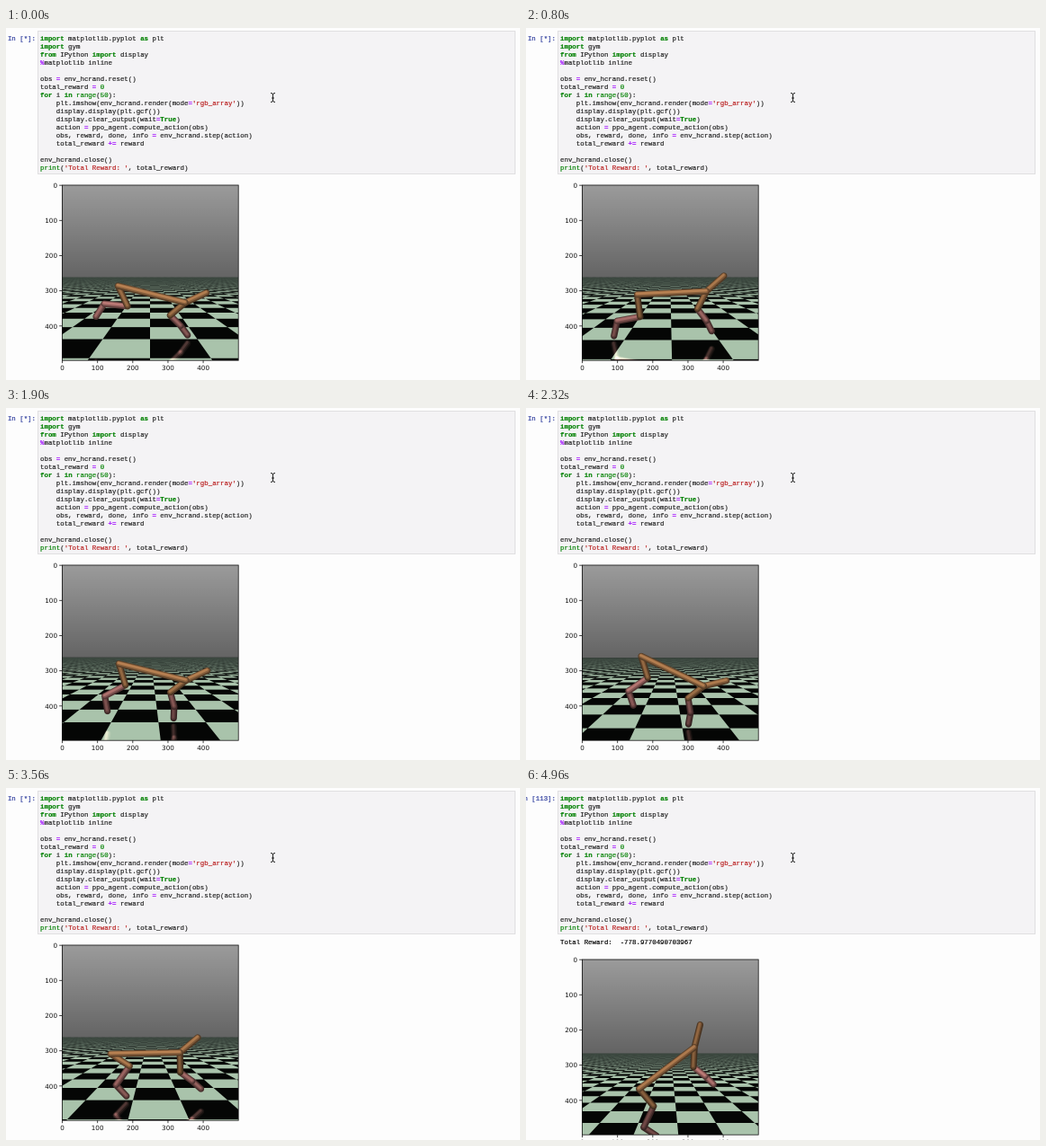
These frames come from a looping animation (571 px wide and 392 px high, 4.98 s). An HTML page with a canvas:

```html
<!DOCTYPE html>
<html lang="en">
<head>
<meta charset="utf-8">
<title>Notebook run</title>
<style>
html, body { margin: 0; width: 571px; height: 392px; overflow: hidden; background: #fdfdfd; }
body { position: relative; }
.cell { position: absolute; left: 35px; top: 3.3px; width: 531px; height: 160px; box-sizing: border-box; background: #f4f3f5; border: .7px solid #e0dfe1; }
pre { position: absolute; margin: 0; font: 7.41px/9px "Liberation Mono", "Courier New", monospace; color: #222; white-space: pre; -webkit-text-stroke: .2px currentColor; }
#code { left: 38px; top: 8px; }
#prompt { right: 538px; top: 8px; color: #303f9f; }
#total { left: 38px; top: 167.8px; color: #000; }
.k { color: #008000; font-weight: bold; }
.n { color: #008000; }
.s { color: #ba2121; }
.o { color: #aa22ff; font-weight: bold; }
svg, canvas { position: absolute; left: 0; top: 0; }
#plot { position: absolute; left: 0; top: 0; width: 571px; height: 392px; }
#plot.moved { top: 15.5px; }
#plot text { font: 7.2px "DejaVu Sans", sans-serif; fill: #111; }
#view { left: 62px; top: 175px; width: 196px; height: 195px; }
</style>
</head>
<body>
<div class="cell"></div>
<pre id="prompt">In [*]:</pre>
<pre id="code"><span class="k">import</span> matplotlib.pyplot <span class="k">as</span> plt
<span class="k">import</span> gym
<span class="k">from</span> IPython <span class="k">import</span> display
<span class="o">%</span>matplotlib inline

obs <span class="o">=</span> env_hcrand.reset()
total_reward <span class="o">=</span> <span class="n">0</span>
<span class="k">for</span> i <span class="k">in</span> <span class="n">range</span>(<span class="n">50</span>):
    plt.imshow(env_hcrand.render(mode<span class="o">=</span><span class="s">'rgb_array'</span>))
    display.display(plt.gcf())
    display.clear_output(wait<span class="o">=</span><span class="k">True</span>)
    action <span class="o">=</span> ppo_agent.compute_action(obs)
    obs, reward, done, info <span class="o">=</span> env_hcrand.step(action)
    total_reward <span class="o">+=</span> reward

env_hcrand.close()
<span class="n">print</span>(<span class="s">'Total Reward: '</span>, total_reward)</pre>
<pre id="total" hidden>Total Reward:  -778.9770490703967</pre>
<div id="plot">
  <canvas id="view"></canvas>
  <svg id="axes" width="571" height="392" overflow="visible">
    <rect x="62.4" y="175" width="195.8" height="195.2" fill="none" stroke="#111" stroke-width=".8"/>
  </svg>
</div>
<svg width="571" height="392" fill="none" stroke="#222" stroke-width="1">
  <path d="M294 72.5q2.5 0 2.5 1.5q0-1.5 2.5-1.5M296.5 74v7M294 82.5q2.5 0 2.5-1.5q0 1.5 2.5 1.5M295 78h3"/>
</svg>
<script>
const LOOP = 4980, STEP = 98, DONE = 4860, LAST = 49;
const $ = id => document.getElementById(id);

// Axis ticks and labels
let marks = '';
for (let i = 0; i < 5; i++) {
  const d = i * 39.15, x = 62.5 + d, y = 175.2 + d, label = i * 100;
  marks += `<path d="M59.2 ${y}h3M${x} 370.2v3" stroke="#111" stroke-width=".8"/>` +
    `<text x="57" y="${y + 2.7}" text-anchor="end">${label}</text>` +
    `<text x="${x}" y="381" text-anchor="middle">${label}</text>`;
}
$('axes').insertAdjacentHTML('beforeend', marks);

// Key poses: step, then degrees of torso, rear thigh, rear shin, front thigh, front shin
const POSES = [
  [0, 14, 65, 186, 140, 45],
  [3, -6, 72, 140, 127, 40],
  [12, 0, 76, 178, 124, 78],
  [19, 14, 73, 152, 143, 75],
  [28, 40, 92, 156, 123, 69],
  [43, -37, -5, 113, 45, -7],
  [LAST, -37, 50, 115, 93, 38]
];
const BROWN = [188, 132, 84], PINK = [204, 132, 128];
const CX = 160, HORIZON = 272.6, FOCAL = 236.6, TILE = 2 / 3;
const BALANCE = [162.5, 304.9], SOLE = 4.5;
const mean = list => list.reduce((a, b) => a + b, 0) / list.length;

function anglesAt(step) {
  const k = Math.max(1, POSES.findIndex(p => p[0] >= step));
  const a = POSES[k - 1], b = POSES[k], span = b[0] - a[0];
  const u = (step - a[0]) / span;
  const stride = 13 * Math.sin(2 * Math.PI * u * Math.round(span / 6));
  const swing = [0, 0, stride, stride, -stride, -stride];
  return a.map((v, i) => v + (b[i] - v) * u + swing[i]).slice(1);
}

// Limbs end to end from one joint; each link is [length, degrees, colour]
function chain([x, y], links) {
  return links.map(([len, deg, rgb]) => {
    const a = deg * Math.PI / 180, from = [x, y];
    x += len * Math.cos(a);
    y += len * Math.sin(a);
    return { from, to: [x, y], rgb };
  });
}

function bodyAt(step) {
  const [tilt, thighR, shinR, thighF, shinF] = anglesAt(step);
  const [torso, head] = chain([0, 0], [[77, tilt, BROWN], [26, tilt - 39, BROWN]]);
  // Each foot turns with its shin
  const rear = chain([0, 0], [[25, thighR, BROWN], [26, shinR, PINK], [17, 1.25 * shinR - 110, PINK]]);
  const front = chain(torso.to, [[22, thighF, BROWN], [16.5, shinF, PINK], [13, 1.3 * shinF - 5, PINK]]);
  const limbs = [...rear.reverse(), ...front.reverse(), head, torso];
  // The camera keeps the centre of mass still: half torso, half all joints
  const move = BALANCE.map((c, axis) =>
    c - (torso.to[axis] / 2 + mean([0, ...limbs.map(l => l.to[axis])])) / 2);
  const place = p => p.map((v, axis) => v + move[axis]);
  return limbs.map(l => ({ from: place(l.from), to: place(l.to), rgb: l.rgb }));
}

const view = $('view'), c = view.getContext('2d');
const scale = 2 * (window.devicePixelRatio || 1);
view.width = 196 * scale;
view.height = 195 * scale;
c.scale(scale, scale);
c.translate(-62, -175);
c.lineCap = 'round';

function fade(y0, y1, from, to) {
  const g = c.createLinearGradient(0, y0, 0, y1);
  g.addColorStop(0, from);
  g.addColorStop(1, to);
  return g;
}

// Checkerboard on a plane seen by a level camera
function drawFloor(ground, shift) {
  const drop = (ground - HORIZON) * 3, edge = HORIZON + drop / 45;
  const corner = (x, d) => [CX + x * FOCAL / d, HORIZON + drop / d];
  c.fillStyle = '#050605';
  c.fillRect(62, edge, 196, 95);
  c.fillStyle = '#a9c3ab';
  c.beginPath();
  for (let r = -2; r < 60; r++) {
    const near = 3 + r * TILE, far = near + TILE;
    const reach = Math.ceil(98 * far / FOCAL / TILE) + 2;
    for (let q = -reach; q <= reach; q++) {
      if ((q + r) & 1) continue;
      const x0 = q * TILE + shift, x1 = x0 + TILE;
      c.moveTo(...corner(x0, near));
      c.lineTo(...corner(x1, near));
      c.lineTo(...corner(x1, far));
      c.lineTo(...corner(x0, far));
      c.closePath();
    }
  }
  c.fill();
  c.fillStyle = fade(edge, edge + 24, 'rgba(58,70,62,1)', 'rgba(58,70,62,0)');
  c.fillRect(62, edge, 196, 24);
}

const tint = (rgb, k) => `rgb(${rgb.map(v => Math.round(v * k)).join()})`;

// Level limbs catch more light, low ones less
function light({ from: [x0, y0], to: [x1, y1] }) {
  const level = Math.abs(x1 - x0) / Math.hypot(x1 - x0, y1 - y0);
  const height = Math.max(.6, Math.min(1, 1.1 - ((y0 + y1) / 2 - 285) / 150));
  return (.72 + .28 * level) * height;
}

function drawBody(limbs) {
  for (const limb of limbs) {
    const lit = light(limb);
    for (let layer = 0; layer < 3; layer++) {
      c.strokeStyle = tint(limb.rgb, lit * (.48 + .25 * layer));
      c.lineWidth = 7.2 - 2.3 * layer;
      c.beginPath();
      for (const [x, y] of [limb.from, limb.to]) c.lineTo(x - layer * .25, y - layer * .5);
      c.stroke();
    }
  }
}

function drawScene(step) {
  const limbs = bodyAt(step);
  const ground = SOLE + Math.max(...limbs.map(l => l.to[1]));
  c.fillStyle = fade(175, 278, '#9b9b9b', '#646464');
  c.fillRect(62, 175, 196, 195);
  drawFloor(ground, TILE * (step / 45) ** 2);
  c.save();
  c.beginPath();
  c.rect(62, ground, 196, 60);
  c.clip();
  c.globalAlpha = .3;
  c.globalCompositeOperation = 'lighter';
  const mirror = ([x, y]) => [x, 2 * ground - y];
  drawBody(limbs.map(l => ({ from: mirror(l.from), to: mirror(l.to), rgb: l.rgb })));
  c.restore();
  drawBody(limbs);
}

let shownStep, shownDone;
function tick() {
  const t = performance.now() % LOOP;
  const step = Math.min(LAST, Math.floor(t / STEP)), done = t >= DONE;
  if (step !== shownStep) drawScene(shownStep = step);
  if (done !== shownDone) {
    shownDone = done;
    $('prompt').textContent = done ? 'In [113]:' : 'In [*]:';
    $('total').hidden = !done;
    $('plot').classList.toggle('moved', done);
  }
  requestAnimationFrame(tick);
}
tick();
</script>
</body>
</html>
```
